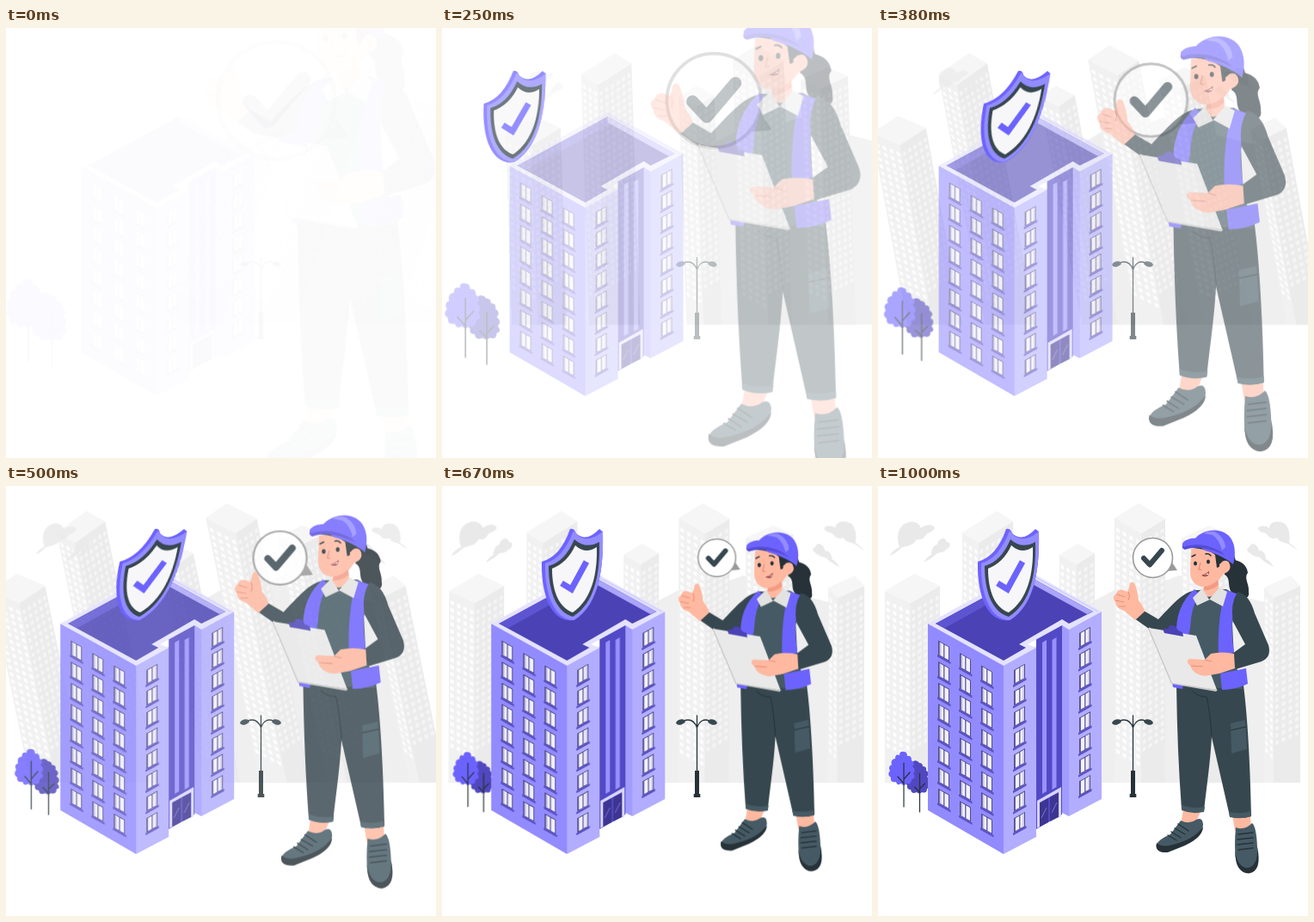
An HTML page that plays this animation: 500x500 px, repeating every 1040 ms.

```html
<!DOCTYPE html>
<html lang="en">
<head>
<meta charset="utf-8">
<title>Building inspection</title>
<style>
html, body { margin: 0; width: 100%; height: 100%; overflow: hidden; background: #fff; }
svg { display: block; width: 100%; height: 100%; }
.part { animation: fade 1s cubic-bezier(.36, -.01, .5, 1.38) both paused; }
#city { animation-name: fromRight; transform-origin: 250px 182px; }
#clouds { animation-name: grow; transform-origin: 250px 66px; }
#trees { animation-name: shrink; transform-origin: 38px 344px; }
#block { animation-name: slide; }
#shield { animation-name: fromLeft; transform-origin: 151px 104px; }
#bubble { animation-name: shrinkFar; transform-origin: 322px 83px; }
#person { animation-name: shrink; transform-origin: 364px 250px; }
@keyframes fade { from { opacity: 0 } to { opacity: 1 } }
@keyframes slide { from { opacity: 0; transform: translateX(30px) } to { opacity: 1; transform: translateX(0) } }
@keyframes grow { from { opacity: 0; transform: scale(.5) } to { opacity: 1; transform: scale(1) } }
@keyframes shrink { from { opacity: 0; transform: scale(1.5) } to { opacity: 1; transform: scale(1) } }
@keyframes shrinkFar { from { opacity: 0; transform: scale(3) } to { opacity: 1; transform: scale(1) } }
@keyframes fromRight {
  from { opacity: 0; transform: translateX(250px) skewX(-20deg) }
  60% { opacity: 1; transform: translateX(0) skewX(10deg) }
  80% { opacity: 1; transform: translateX(0) skewX(-2deg) }
  to { opacity: 1; transform: translateX(0) skewX(0) }
}
@keyframes fromLeft {
  from { opacity: 0; transform: translateX(-250px) skewX(20deg) }
  60% { opacity: 1; transform: translateX(0) skewX(-10deg) }
  80% { opacity: 1; transform: translateX(0) skewX(2deg) }
  to { opacity: 1; transform: translateX(0) skewX(0) }
}
.dark { fill: #263238 } .slate { fill: #37474f } .shirt { fill: #455a64 }
.violet { fill: #6c63ff } .deep { fill: #4a42b5 } .skin { fill: #ffb9a1 }
.line { fill: none; stroke: #263238; stroke-linecap: round; stroke-linejoin: round }
</style>
</head>
<body>
<svg viewBox="0 0 500 500">
  <g id="city" class="part">
    <path fill="#efefef" d="M252 133L275 121 334 110 350 104 410 125 449 135H491V345H252z"/>
    <g id="towers"></g>
  </g>

  <g id="clouds" class="part" fill="#e9e9e9">
    <path id="puff" d="M14 81C17 75 21 73 25 71 21 60 23 47 33 43 41 39 48 43 50 49 55 44 65 44 66 49 64 53 60 54 56 56 54 61 50 63 45 62 40 71 32 69 27 72 23 76 19 79 14 81z"/>
    <path d="M53 89C56 84 59 81 62 80 62 73 65 69 69 68 70 61 78 58 80 65 86 66 84 72 79 74 75 79 71 76 68 79 63 84 58 86 53 89z"/>
    <path d="M488 75C484 70 481 68 478 66 480 55 477 43 468 42 460 40 455 44 455 49 450 45 442 46 442 50 444 54 449 54 452 56 455 61 460 62 464 60 468 67 474 65 478 68z"/>
    <path d="M460 94C457 89 454 86 451 85 451 78 447 75 443 75 441 66 433 65 432 71 427 72 429 77 434 79 438 83 441 81 445 84 449 89 455 91 460 94z"/>
  </g>

  <g id="lamp" class="part">
    <path class="line" stroke-width="1.3" d="M296.5 267V332M296.5 281Q292 269 281 273M296.5 281Q301 269 311 273"/>
    <path class="dark" d="M294 331h5v27h1.3v4h-7.6v-4H294z"/>
    <ellipse class="slate" cx="277.500" cy="274.500" rx="5.500" ry="3" transform="rotate(-14 277.5 274.500)"/>
    <ellipse class="slate" cx="314.500" cy="274.500" rx="5.500" ry="3" transform="rotate(14 314.500 274.500)"/>
  </g>

  <g id="trees" class="part">
    <path fill="#5148bf" d="M48 322q4 0 4 4 5 0 4 5 5 3 1 7 5 4 1 8 4 5-1 6 0 6-6 4-3 3-6 0-6 3-7-3-5 0-4-5-4-3-1-7-3-5 1-8-3-5 2-7 0-5 4-4 1-4 6-2z"/>
    <path class="line" stroke-width="1.2" d="M48.500 334V379M48.500 352l6-6M48.500 356l-6-6"/>
    <path class="violet" d="M30 309q4 0 4 5 5-1 5 5 5 3 1 7 5 4 1 8 4 6-2 7 0 7-6 5-3 4-6 0-5 3-6-2-7 1-6-5-5-3-1-8-3-5 2-7-2-6 4-7 0-6 5-4 0-5 5-4z"/>
    <path class="line" stroke-width="1.2" d="M30 322V373M30 341l7-8M30 346l-7-8"/>
  </g>

  <g id="block" class="part">
    <path fill="#928bff" d="M58 160L146 208V428L58 377z"/>
    <path fill="#b2adff" d="M146 208L184 187V408L146 428zM222 165L260 146V364L222 384z"/>
    <path fill="#5249c6" d="M184 177L214 161V382L184 399z"/>
    <path fill="#9891ff" d="M191 182l5-3V355l-5 3zM202.500 179l5-3V350l-5 3z"/>
    <path fill="#a29cff" d="M214 161L222 165V384L214 380z"/>
    <path fill="#e4e2ff" d="M58 160L172 97 260 146 222 167 214 162 174 184 184 188 146 209z"/>
    <path class="deep" d="M67 160L172 103 250 146 222 160 214 155 164 184 172 188 146 203z"/>
    <path fill="#5d54d2" d="M67 160L172 103V113L78 165z"/>
    <path fill="#aaa5fa" d="M172 103L250 146 243 149 172 110z"/>
    <path fill="none" stroke="#c9c6ff" d="M172 100L256 146"/>
    <path fill="#d8d5ff" d="M185 366L213 350V384L210 386V356L188 368V396L185 398z"/>
    <path fill="#3d3591" d="M188 369L198 363V391L188 396zM200 362L210 357V385L200 390z"/>
    <path stroke="#8a83e0" stroke-width=".8" d="M190 386l6-12M202 380l6-12"/>
    <g id="windows"></g>
  </g>

  <g id="shield" class="part">
    <path class="violet" d="M116 88Q138 82 149 50 154 49 156 55 168 66 183 50L187 53C188 92 184 137 154 156 131 160 115 134 116 88z"/>
    <path fill="#938cff" d="M120 90Q141 84 153 52 166 70 187 53C188 92 184 137 153 156 133 156 119 130 120 90z"/>
    <path class="slate" d="M124 93Q143 88 154 62 167 74 183 65C184 101 178 136 152 152 134 147 124 125 124 93z"/>
    <path fill="#f7f7f9" d="M128 96Q146 89 155 69 167 80 180 71C181 102 174 132 152 147 137 142 128 124 128 96z"/>
    <path fill="none" stroke="#6c63ff" stroke-width="7" d="M139 113L150.500 120 168 88"/>
  </g>

  <g id="bubble" class="part">
    <path fill="#9a9a9a" d="M336 99L348 98 342 89z"/>
    <circle cx="319.500" cy="83.500" r="23" fill="#fff" stroke="#9a9a9a" stroke-width="1.6"/>
    <path class="line" style="stroke:#37474f;stroke-width:6" d="M309 84L316 91.500 330 75"/>
  </g>

  <g id="person" class="part">
    <path class="dark" d="M402 86C418 84 429 90 430 101 425 107 432 114 431 123 433 132 422 134 414 126 404 119 412 108 403 103z"/>
    <!-- legs and shoes -->
    <path class="skin" d="M355 376H376L369 393 352 394zM412 382H433L434 399 415 401z"/>
    <path class="shirt" d="M352 389Q362 394 370 388 378 384 378 395 373 410 357 416L337 424Q322 425 324 417 326 411 340 405zM416 397Q426 401 435 392 440 396 441 420 445 448 430 449 418 449 416 434 414 418 416 397z"/>
    <path class="dark" d="M324 415Q330 421 343 417 368 411 378 396 378 408 357 418L337 426Q321 427 324 415zM415 424Q418 444 430 444 442 442 441 420 447 448 431 450.500 416 450 415 424z"/>
    <path class="line" stroke-width="1.4" d="M349 393l12 8M345 398l12 7M341 402l11 7M337 406l10 6M419 405l17-2M418 411l18-2M418 417l18-2M419 423l17-2"/>
    <path class="slate" d="M347 231L425 232C430 270 433 330 434 384Q422 388 409 384L388 292C386 325 382 350 379 378Q365 381 353 376 348 310 347 231z"/>
    <path class="shirt" d="M353 371Q366 376 380 373L379 379Q365 382 353 377zM408 379Q422 382 434 378V384Q422 388 409 385zM410 276L427 272 429 306 411 311z"/>
    <path class="line" stroke-width="1" d="M366 239Q374 246 382 245 386 262 388 290M410 284L428 280"/>
    <!-- body -->
    <path class="shirt" d="M370 121L405 120 420 128 412 160 414 200 424 236 348 233 350 165z"/>
    <path class="slate" d="M372 121C356 122 346 134 326 155L309 145 298 154 318 168 334 181 354 160z"/>
    <path class="violet" d="M368 120L374 126Q364 140 363 165L360 180 347 175Q345 140 368 120zM404 121L420 126Q407 152 414 193L396 201Q394 155 404 121zM342 228L355 231 354 236 343 234zM398 218L428 212 430 230Q416 237 400 237z"/>
    <path class="slate" d="M418 123Q432 126 438 148L454 185Q458 199 446 204L416 213 412 195 427 184 413 158Q409 138 418 123z"/>
    <!-- head -->
    <path class="skin" d="M364 73L363 99Q363 114 376 117L379 117 377 124Q384 134 397 123L395 111 402 102Q413 98 408 88L398 72z"/>
    <path fill="#f49b84" d="M379 117Q389 116 395 109L396 115Q388 122 379 121z"/>
    <path fill="#e2e2e2" d="M377 119L385 132 397 118 406 123 401 140 386 132 371 139 366 130z"/>
    <path class="dark" d="M365 72Q384 73 392 80L394 95Q398 95 400 88 408 84 410 94L416 87 413 76 384 67z"/>
    <path class="skin" d="M397 91Q403 85 406 91 407 100 398 103z"/>
    <ellipse class="dark" cx="369" cy="90" rx="2" ry="2.500"/>
    <ellipse class="dark" cx="384" cy="88" rx="2" ry="2.500"/>
    <path class="line" stroke-width="1.5" d="M365 82l4-2M381 79q4-1 6 2"/>
    <path fill="none" stroke="#e88d78" stroke-width="1.3" d="M375 89l-2 8 3 .5"/>
    <path fill="#8f3c3c" d="M376 104Q381 103 385 99 385 108 376 104z"/>
    <path fill="#fff" d="M378 104Q382 103 384 101V103z"/>
    <path class="violet" d="M366 65C373 51 397 46 409 59 416 68 416 80 413 91 405 84 392 78 380 75z"/>
    <path fill="#938cff" d="M378 55Q386 51 393 54 403 60 404 71L400 75Q397 62 389 57z"/>
    <path fill="#554cd5" d="M354 69C358 61 374 62 388 67L404 81C388 73 372 69 357 74Q353 73 354 69z"/>
    <path class="violet" d="M354 67C360 58 378 60 392 66L400 77C384 68 370 66 355 71z"/>
    <!-- raised thumb -->
    <path class="skin" d="M298 113Q293 109 292 118L290 123Q280 117 277 125 271 129 276 135 276 142 286 145L299 156 310 146Q309 140 303 133 302 121 298 113z"/>
    <path fill="none" stroke="#e88d78" d="M278 126l9 3M276 133l10 2M280 140l8 0M291 123q3 5 0 10"/>
    <!-- clipboard -->
    <path fill="#c7c7c7" d="M314 166L316 164 343 228 395 237 393 239 341 230z"/>
    <path fill="#e9e9e9" d="M315 165L370 174 394 237 342 229z"/>
    <path class="deep" d="M331 166L337 166Q339 160 346 163L349 168 354 170 355 175 333 171z"/>
    <path class="skin" d="M414 195Q400 192 387 195L380 202 362 201Q357 204 363 209 366 219 380 221L397 218 415 212z"/>
    <path fill="none" stroke="#e88d78" d="M364 209l14 1M380 202l8 2"/>
  </g>
</svg>
<script>
const byId = id => document.getElementById(id);
const quad = (x, y, w, h, k) => `M${x} ${y}l${w} ${w * k}v${h}l${-w} ${-w * k}z`;
const path = (fill, d) => `<path fill="${fill}" d="${d}"/>`;

function grid(x0, y0, x1, y1) {
  const k = (y1 - y0) / (x1 - x0), n = Math.round((x1 - x0) / 7), step = (x1 - x0) / n;
  let d = '';
  for (let i = 0; i < n; i++) {
    const x = x0 + (i + .25) * step;
    for (let y = y0 + 10; y < 306; y += 8.3) d += quad(x, y + k * (x - x0), step * .52, 4.6, k);
  }
  return d;
}

// left, front and right corners of each roof
function tower([lx, ly, fx, fy, rx, ry]) {
  return path('#f1f1f1', `M${lx} ${ly}L${fx} ${fy}V345H${lx}z`) +
    path('#ebebeb', `M${fx} ${fy}L${rx} ${ry}V345H${fx}z`) +
    path('#f6f6f6', `M${lx} ${ly}L${fx} ${fy} ${rx} ${ry} ${lx + rx - fx} ${ly + ry - fy}z`) +
    path('#fdfdfd', grid(lx, ly, fx, fy)) + path('#f5f5f5', grid(fx, fy, rx, ry));
}

byId('towers').innerHTML = [
  [98, 54, 117, 66, 157, 41], [211, 80, 231, 91, 252, 78],
  [353, 60, 376, 70, 408, 56], [275, 37, 306, 55, 334, 38],
  [8, 122, 38, 136, 72, 116], [449, 118, 460, 130, 491, 116]
].map(tower).join('');

function pane(x, y, k) {
  const at = dx => y + dx * k;
  return path('#514a8c', quad(x, y, 13, 17, k)) +
    path('#f1f0ff', quad(x + 1.8, at(1.8) + 1, 4.4, 15, k) + quad(x + 7.4, at(7.4) + 1, 4.6, 15, k)) +
    path('#c9c8e6', quad(x + (k > 0 ? 1.8 : 10), at(k > 0 ? 1.8 : 10) + 1, 1.8, 15, k)) +
    path('#5a51c4', quad(x - 1, at(-1) + 17, 15.5, 2.6, k));
}

const columns = [[70, 179.5, .57], [95, 194, .57], [120, 208.500, .57], [158, 214, -.56], [234, 171, -.56]];
let panes = '';
for (const [x, y, k] of columns)
  for (let row = 0; row < 8; row++) panes += pane(x, y + row * 24.6, k);
byId('windows').innerHTML = panes;

// 24 steps a second; the opening pose is held for two steps
const LOOP = 1040, STEP = 1000 / 24, LEAD = 45;
const parts = document.getAnimations();
const start = performance.now();
function draw() {
  const t = Math.max(0, performance.now() - start) % LOOP;
  const step = Math.max(1, Math.floor((t + 4) / STEP));
  const time = Math.min(1000, step * STEP + LEAD);
  for (const part of parts) part.currentTime = time;
  requestAnimationFrame(draw);
}
draw();
</script>
</body>
</html>
```
